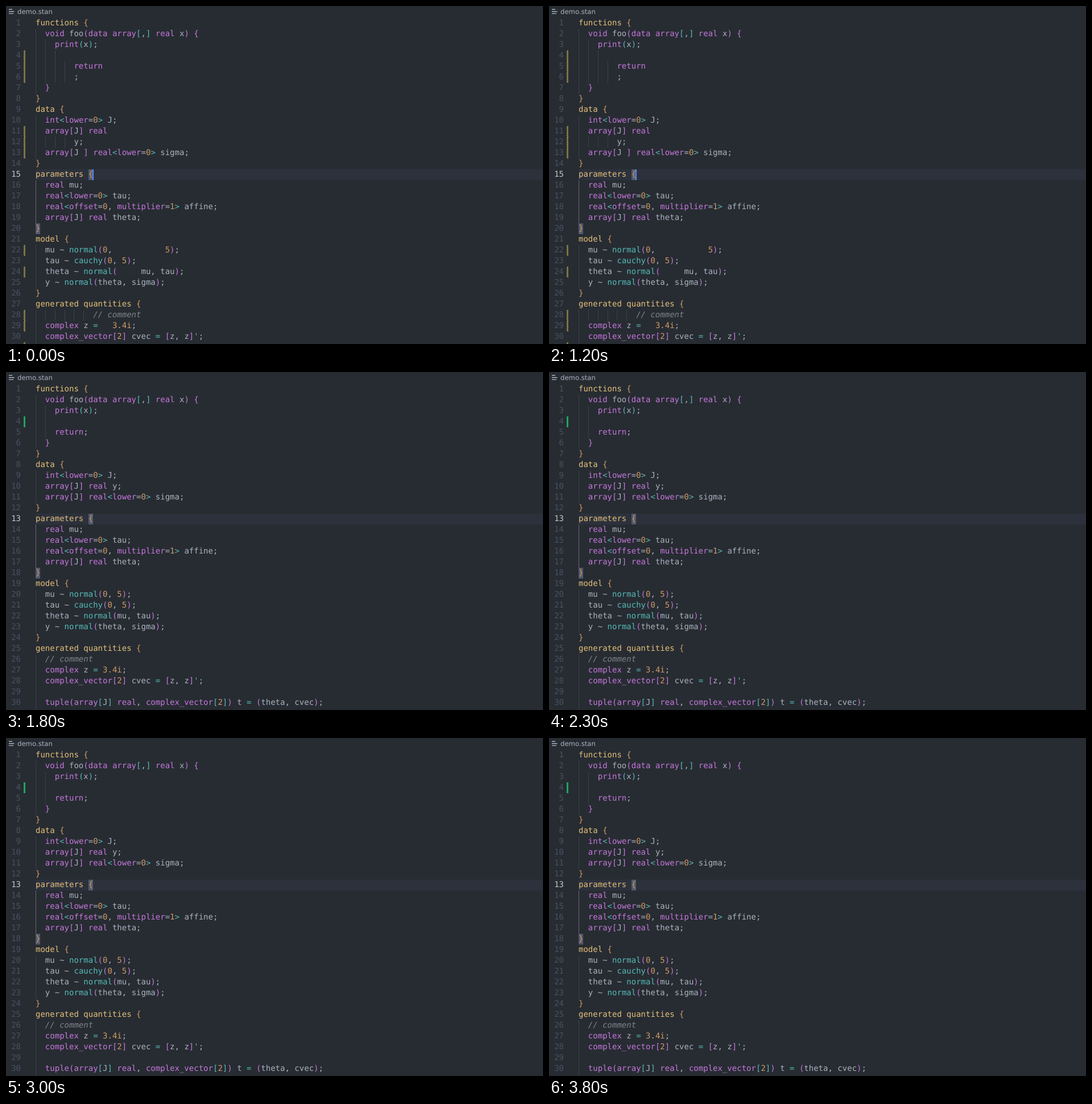
An HTML page that plays this animation: 944x594 px, repeating every 4200 ms.

```html
<!DOCTYPE html>
<html lang="en">
<head>
<meta charset="utf-8">
<style>
  html, body { margin: 0; width: 100%; height: 100%; overflow: hidden; background: #272c32; }
  body, .view { position: absolute; inset: 0; }
  .title { position: absolute; left: 20px; top: 1px; color: #abb2bf;
    font: 11.7px/19px "DejaVu Sans", sans-serif; text-rendering: geometricPrecision; }
  svg { position: absolute; left: 0; top: 0; }
  .row { position: absolute; left: 0; width: 100%; height: 19px; color: #abb2bf; white-space: pre;
    font: 14px/19px "DejaVu Sans Mono", monospace; text-rendering: geometricPrecision; }
  .row * { position: absolute; top: 0; height: 19px; }
  .row .code { left: 52px; }
  .code span { position: static; }
  .num { right: calc(100% - 26px); color: #495162; }
  .now .num { color: #c3c8d0; }
  .line { left: 52px; right: 0; background: #2c313c; }
  .guide { width: 1px; background: #3b4048; }
  .guide.active { background: #666a70; }
  .match { width: 8.4px; background: #515a6b; }
  .mark { left: 31px; width: 3px; background: #1fa463; }
  .mark.dirty { background: linear-gradient(-45deg, #a3954f 25%, transparent 25% 50%, #a3954f 50% 75%, transparent 75%) 0 0 / 3px 3px; }
  .block { color: #e5c07b; }
  .key { color: #c678dd; }
  .call, .op { color: #56bab8; }
  .lit { color: #d19a66; }
  .note { color: #7f848e; font-style: italic; }
  #caret { position: absolute; left: 152px; width: 2px; height: 19px; background: #528bff; }
</style>
</head>
<body>
<svg width="18" height="19" stroke="#abb2bf" stroke-width="1.4"><path d="M5 6h6M5 9.7h9.5M5 13.4h8"/></svg>
<div class="title">demo.stan</div>
<script>
const CHAR = 14 * 0.602, LEFT = 52, TOP = 21, LINE = 19, LOOP = 4200;

const messy = `functions {
  void foo(data array[,] real x) {
    print(x);
      
        return
        ;
  }
}
data {
  int<lower=0> J;
  array[J] real
        y;
  array[J ] real<lower=0> sigma;
}
parameters {
  real mu;
  real<lower=0> tau;
  real<offset=0, multiplier=1> affine;
  array[J] real theta;
}
model {
  mu ~ normal(0,           5);
  tau ~ cauchy(0, 5);
  theta ~ normal(     mu, tau);
  y ~ normal(theta, sigma);
}
generated quantities {
            // comment
  complex z =   3.4i;
  complex_vector[2] cvec = [z, z]';
  `;

const tidy = `functions {
  void foo(data array[,] real x) {
    print(x);
    
    return;
  }
}
data {
  int<lower=0> J;
  array[J] real y;
  array[J] real<lower=0> sigma;
}
parameters {
  real mu;
  real<lower=0> tau;
  real<offset=0, multiplier=1> affine;
  array[J] real theta;
}
model {
  mu ~ normal(0, 5);
  tau ~ cauchy(0, 5);
  theta ~ normal(mu, tau);
  y ~ normal(theta, sigma);
}
generated quantities {
  // comment
  complex z = 3.4i;
  complex_vector[2] cvec = [z, z]';
  
  tuple(array[J] real, complex_vector[2]) t = (theta, cvec);
  `;

const tokens = /\/\/.*|[a-z_]\w*|\d[\d.]*i?|[(){}[\]]|(?<= )=|[<>']/gi;
const keywords = /^(void|data|array|real|print|return|int|lower|offset|multiplier|complex|complex_vector|tuple)$/;
const bracketKinds = ['lit', 'key', 'call'];

function add(parent, cls, x) {
  const el = parent.appendChild(document.createElement('div'));
  el.className = cls;
  if (x !== undefined) el.style.left = x + 'px';
  return el;
}

// Bracket colours follow nesting depth, which carries over from line to line.
function highlighter(plain) {
  let depth = 0;
  const kind = word => {
    if (word.startsWith('//')) return 'note';
    if (/[({[]/.test(word)) return bracketKinds[depth++ % 3];
    if (/[)}\]]/.test(word)) return bracketKinds[--depth % 3];
    if (/^\d/.test(word)) return 'lit';
    if (/[=<>']/.test(word)) return 'op';
    if (depth === 0) return 'block';
    if (/^(normal|cauchy)$/.test(word)) return 'call';
    return keywords.test(word) && word !== plain ? 'key' : '';
  };
  return line => line.replace(tokens, word => {
    const cls = kind(word);
    return `<span class="${cls}">${word.replace('<', '&lt;').replace('>', '&gt;')}</span>`;
  });
}

function build({ text, now, marks, mark, plain }) {
  const view = add(document.body, 'view');
  const paint = highlighter(plain);
  const close = now + 5;
  text.split('\n').forEach((line, i) => {
    const n = i + 1;
    const row = add(view, n === now ? 'row now' : 'row');
    row.style.top = TOP + i * LINE + 'px';
    if (n === now) add(row, 'line');
    const indent = line.match(/^ */)[0].length;
    for (let col = 0; col < indent; col += 2) {
      const active = col === 0 && n > now && n < close;
      add(row, active ? 'guide active' : 'guide', LEFT + Math.round(col * CHAR));
    }
    if (n === now || n === close) add(row, 'match', LEFT + (line.length - 1) * CHAR);
    if (marks.includes(n)) add(row, mark);
    add(row, 'num').textContent = n;
    add(row, 'code').innerHTML = paint(line);
  });
  return view;
}

const stages = [
  { from: 0, text: messy, now: 15, mark: 'mark dirty', marks: [4, 5, 6, 11, 12, 13, 22, 24, 28, 29, 31] },
  { from: 1400, text: tidy, now: 13, mark: 'mark dirty', marks: [4, 5, 10, 11, 20, 22, 26, 27, 29], plain: 'return' },
  { from: 1500, text: tidy, now: 13, mark: 'mark', marks: [4] }
];
for (const stage of stages) stage.view = build(stage);

const caret = add(document.body, '');
caret.id = 'caret';
const caretOn = [[0, 600], [1100, 1800], [2400, 3000], [3500, 3800]];

function draw(t) {
  const current = stages.findLast(stage => t >= stage.from);
  for (const stage of stages) stage.view.style.display = stage === current ? '' : 'none';
  caret.style.top = TOP + (current.now - 1) * LINE + 'px';
  caret.style.display = caretOn.some(([a, b]) => t >= a && t < b) ? '' : 'none';
}

const start = performance.now();
function tick() {
  draw((performance.now() - start) % LOOP);
  requestAnimationFrame(tick);
}
tick();
</script>
</body>
</html>
```
